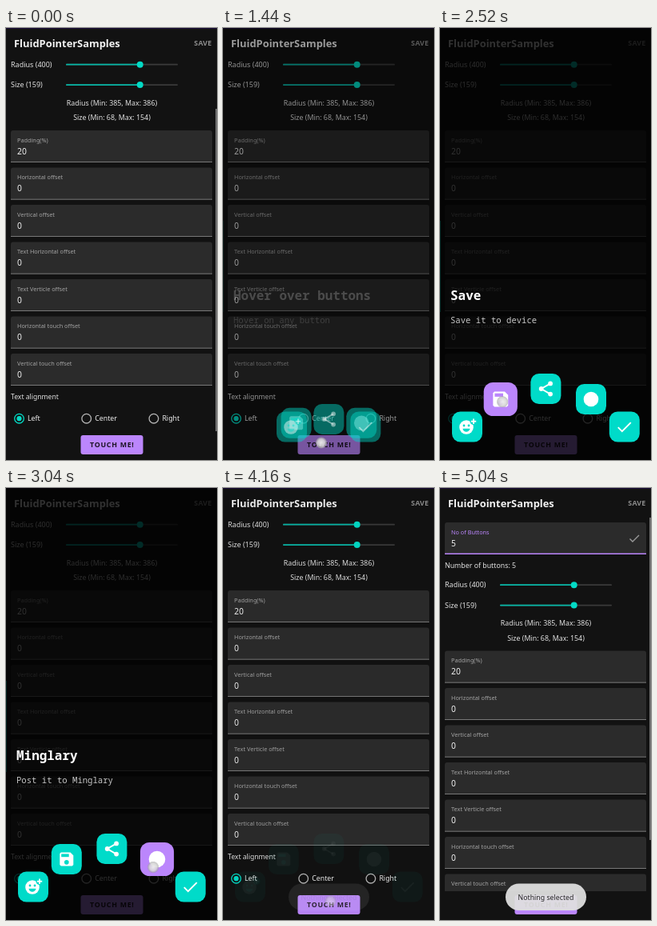
These frames come from a looping animation (264x540 px, 5080 ms). An HTML page with a canvas:

```html
<!DOCTYPE html>
<html lang="en">
<head>
<meta charset="utf-8">
<title>Radial menu demo</title>
<style>
html, body { margin: 0; width: 100%; height: 100%; overflow: hidden; background: #121212; }
canvas { display: block; width: 264px; height: 540px; }
</style>
</head>
<body>
<canvas id="stage" width="264" height="540"></canvas>
<script>
const ctx = document.getElementById('stage').getContext('2d');
const LOOP = 5080;
const SCROLL_MAX = 75.5, VIEW_TOP = 37, VIEW_BOTTOM = 504;
const TEAL = '#03dac5', PURPLE = '#bb86fc', LIGHT = '#e2e2e2';
const SANS = '"Noto Sans", "Open Sans", sans-serif';
const MONO = '"Noto Sans Mono", "DejaVu Sans Mono", monospace';

const clamp = v => Math.max(0, Math.min(1, v));
const ramp = (t, from, to) => clamp((t - from) / (to - from));
const mix = (a, b, p) => a + (b - a) * p;
const smooth = p => 0.5 - 0.5 * Math.cos(Math.PI * p);

// y is the middle of the capital letters
function text(str, x, y, size, color, { weight = 400, align = 'left', family = SANS, spacing = 0 } = {}) {
  ctx.font = `${weight} ${size}px ${family}`;
  ctx.letterSpacing = spacing + 'px';
  ctx.textAlign = align;
  ctx.fillStyle = color;
  ctx.fillText(str, x, y + size * 0.36);
}

function rect(x, y, w, h, color, radius = 0) {
  ctx.fillStyle = color;
  ctx.beginPath();
  ctx.roundRect(x, y, w, h, radius);
  ctx.fill();
}

function disc(x, y, r, color) {
  ctx.fillStyle = color;
  ctx.beginPath();
  ctx.arc(x, y, r, 0, 7);
  ctx.fill();
}

function stroke(points, width, color) {
  ctx.strokeStyle = color;
  ctx.lineWidth = width;
  ctx.beginPath();
  points.forEach(([x, y]) => ctx.lineTo(x, y));
  ctx.stroke();
}

function withAlpha(alpha, draw) {
  if (alpha <= 0) return;
  ctx.save();
  ctx.globalAlpha *= alpha;
  draw();
  ctx.restore();
}

// ---- settings screen ----

function field(label, value, y, focused) {
  rect(6, y, 252, 40, '#2b2b2b', [3, 3, 0, 0]);
  if (focused) rect(6, y + 38.6, 252, 1.4, PURPLE);
  else rect(6, y + 39.2, 252, 0.8, '#929292');
  text(label, 14, y + 12, 7.3, focused ? PURPLE : '#a4a4a4');
  text(value, 14, y + 26, 10.3, '#f0f0f0');
}

function slider(label, y) {
  text(label, 6, y, 9, LIGHT);
  rect(75, y - 0.9, 140, 1.8, '#3a3a3a', 1);
  rect(75, y - 0.9, 93, 1.8, '#04b5a5', 1);
  disc(167.7, y, 4, TEAL);
}

function radio(label, x, y, checked) {
  ctx.strokeStyle = checked ? TEAL : '#b4b4b4';
  ctx.lineWidth = 1.3;
  ctx.beginPath();
  ctx.arc(x, y, 5.8, 0, 7);
  ctx.stroke();
  if (checked) disc(x, y, 3.1, TEAL);
  text(label, x + 10.5, y, 8.8, '#f0f0f0');
}

const FIELDS = ['Padding(%)', 'Horizontal offset', 'Vertical offset', 'Text Horizontal offset',
  'Text Verticle offset', 'Horizontal touch offset', 'Vertical touch offset'];

function settings(scroll, barAlpha) {
  rect(0, 0, 264, 540, '#121212');
  rect(0, 0, 264, 1, '#180a38');

  ctx.save();
  ctx.beginPath();
  ctx.rect(0, VIEW_TOP, 264, VIEW_BOTTOM - VIEW_TOP);
  ctx.clip();
  ctx.translate(0, -scroll);
  field('No of Buttons', '5', 43, true);
  stroke([[237.5, 63.5], [241, 67], [249, 59]], 1.4, '#9a9a9a');
  text('Number of buttons: 5', 6, 96.5, 8.8, LIGHT);
  slider('Radius (400)', 121.2);
  slider('Size (159)', 146.6);
  text('Radius (Min: 385, Max: 386)', 132.5, 169, 8.85, LIGHT, { align: 'center' });
  text('Size (Min: 68, Max: 154)', 132.5, 187.8, 8.85, LIGHT, { align: 'center' });
  FIELDS.forEach((label, i) => field(label, i ? '0' : '20', 203.5 + 46.5 * i));
  text('Text alignment', 6, 536, 8.6, LIGHT);
  ['Left', 'Center', 'Right'].forEach((label, i) => radio(label, 16.5 + 84.2 * i, 563.7, i === 0));
  ctx.restore();

  const barTop = VIEW_TOP + scroll * 64 / SCROLL_MAX;
  withAlpha(barAlpha, () => rect(262, barTop, 2, 403, '#6b6b6b'));

  text('FluidPointerSamples', 10, 19.5, 12.9, '#f2f2f2', { weight: 600 });
  text('SAVE', 257.5, 19, 8.9, '#8c8c8c', { weight: 600, align: 'right', spacing: 0.2 });
  rect(93.5, 509, 78, 24, PURPLE, 3);
  text('TOUCH ME!', 132.8, 521, 8.8, '#1c1424', { weight: 600, align: 'center', spacing: 0.75 });
}

// ---- radial menu ----

const ICONS = {
  smile(back) {
    disc(-1, 0.5, 8.8, '#fff');
    disc(8, -7, 4.6, back);
    stroke([[8, -10], [8, -3.6]], 1.9, '#fff');
    stroke([[4.8, -6.8], [11.2, -6.8]], 1.9, '#fff');
    disc(-4, -1.5, 1.4, back);
    disc(2, -1.5, 1.4, back);
    ctx.beginPath();
    ctx.arc(-1, 1.6, 4.6, 0.15, Math.PI - 0.15);
    ctx.fill();
  },
  save(back) {
    ctx.fillStyle = '#fff';
    ctx.beginPath();
    [[-7, -8.5], [4.7, -8.5], [8.5, -4.7], [8.5, 7], [7, 8.5], [-7, 8.5], [-8.5, 7], [-8.5, -7]]
      .forEach(([x, y]) => ctx.lineTo(x, y));
    ctx.fill();
    rect(-6.6, -6.6, 9.5, 3.8, back);
    disc(0, 3.8, 2.85, back);
  },
  share() {
    stroke([[5.7, -6.6], [-5.7, 0], [5.7, 6.6]], 1.9, '#fff');
    [[5.7, -6.6], [-5.7, 0], [5.7, 6.6]].forEach(([x, y]) => disc(x, y, 2.9, '#fff'));
  },
  post() { disc(0, 0, 9.3, '#fff'); },
  check() { stroke([[-8, 0.6], [-3, 5.6], [8, -5.4]], 1.9, '#fff'); }
};

// start and rest are [x, y] centres
const BUTTONS = [
  { icon: 'save', start: [105, 519], rest: [75.8, 464], title: 'Save', note: 'Save it to device' },
  { icon: 'post', start: [160, 519], rest: [189, 464], title: 'Minglary', note: 'Post it to Minglary' },
  { icon: 'share', start: [132.4, 521], rest: [132.4, 451], title: 'Share', note: 'Share with others' },
  { icon: 'smile', start: [130, 498.5], rest: [34, 498.5], title: 'Emoji', note: 'Add an emoji' },
  { icon: 'check', start: [134, 498.5], rest: [230.8, 498.5], title: 'Done', note: 'Mark it as done' }
];
const PROMPT = { title: 'Hover over buttons', note: 'Hover on any button' };

function hoveredButton([x, y]) {
  return BUTTONS.find(({ rest }) => Math.abs(x - rest[0]) < 19 && Math.abs(y - rest[1]) < 19);
}

function menu(t, finger) {
  const open = smooth(ramp(t, 1370, 1520));
  const alpha = open * (1 - 0.96 * ramp(t, 4080, 4160)) * (1 - ramp(t, 4160, 4240));
  if (alpha <= 0) return;
  const active = t > 1520 && t < 4080 ? hoveredButton(finger) : null;

  withAlpha(alpha, () => {
    rect(0, 0, 264, 540, 'rgba(0,0,0,0.8)');
    rect(0, 241, 0.6, 114, 'rgba(0,120,110,0.5)');
  });

  const words = active || (t < 2100 ? PROMPT : null);
  if (words) withAlpha(alpha * alpha, () => {
    text(words.title, 13, 334.5, 15.95, '#fff', { weight: 600, family: MONO });
    text(words.note, 13, 365.5, 10.62, '#c6c6c6', { family: MONO });
  });

  BUTTONS.forEach(button => withAlpha(alpha, () => {
    const { start, rest, icon } = button;
    const back = button === active ? PURPLE : '#00dbc9';
    ctx.translate(mix(start[0], rest[0], open), mix(start[1], rest[1], open));
    if (button === active) ctx.scale(1.11, 1.11);
    rect(-19, -19, 38, 38, back, 10.5);
    ICONS[icon](back);
  }));
}

// ---- finger and toast ----

// [time, x, y]
const PATH = [
  [800, 123, 518.5], [1440, 123, 518.5], [1760, 117, 516], [2000, 89, 510], [2160, 45, 501],
  [2280, 38, 496], [2480, 73, 470], [2600, 88, 462], [2720, 128, 456], [2840, 143, 458],
  [3040, 184, 474], [3200, 199, 474], [3400, 230, 501], [3600, 234, 503], [3760, 208, 512],
  [4000, 136, 517], [4080, 134.5, 516.5], [5080, 134.5, 516.5]
];

function fingerAt(t) {
  const i = Math.max(1, PATH.findIndex(key => key[0] >= t));
  const [a, b] = [PATH[i - 1], PATH[i]];
  const p = ramp(t, a[0], b[0]);
  return [mix(a[1], b[1], p), mix(a[2], b[2], p)];
}

function touch(t, [x, y]) {
  const alpha = ramp(t, 780, 880) * (1 - ramp(t, 4080, 4240));
  withAlpha(alpha, () => {
    const glow = ctx.createRadialGradient(x, y, 0, x, y, 7.5);
    glow.addColorStop(0, 'rgba(238,238,238,0.95)');
    glow.addColorStop(0.6, 'rgba(215,215,215,0.88)');
    glow.addColorStop(0.88, 'rgba(170,170,170,0.6)');
    glow.addColorStop(1, 'rgba(130,130,130,0)');
    disc(x, y, 7.5, glow);
  });
}

function toast(t) {
  withAlpha(smooth(ramp(t, 4110, 4370)), () => {
    rect(82, 494.5, 101, 33.5, 'rgba(224,224,224,0.94)', 16.7);
    text('Nothing selected', 132.5, 511.5, 8.75, '#262626', { align: 'center' });
  });
}

function draw(t) {
  const settle = 1 - Math.pow(1 - ramp(t, 4400, 4700), 2);
  const barAlpha = t < 1000 ? 1 - ramp(t, 150, 500) : ramp(t, 4390, 4430);
  const finger = fingerAt(t);
  settings(SCROLL_MAX * (1 - settle), barAlpha);
  menu(t, finger);
  toast(t);
  touch(t, finger);
}

const began = performance.now();
function tick() {
  draw((performance.now() - began) % LOOP);
  requestAnimationFrame(tick);
}
tick();
</script>
</body>
</html>
```
